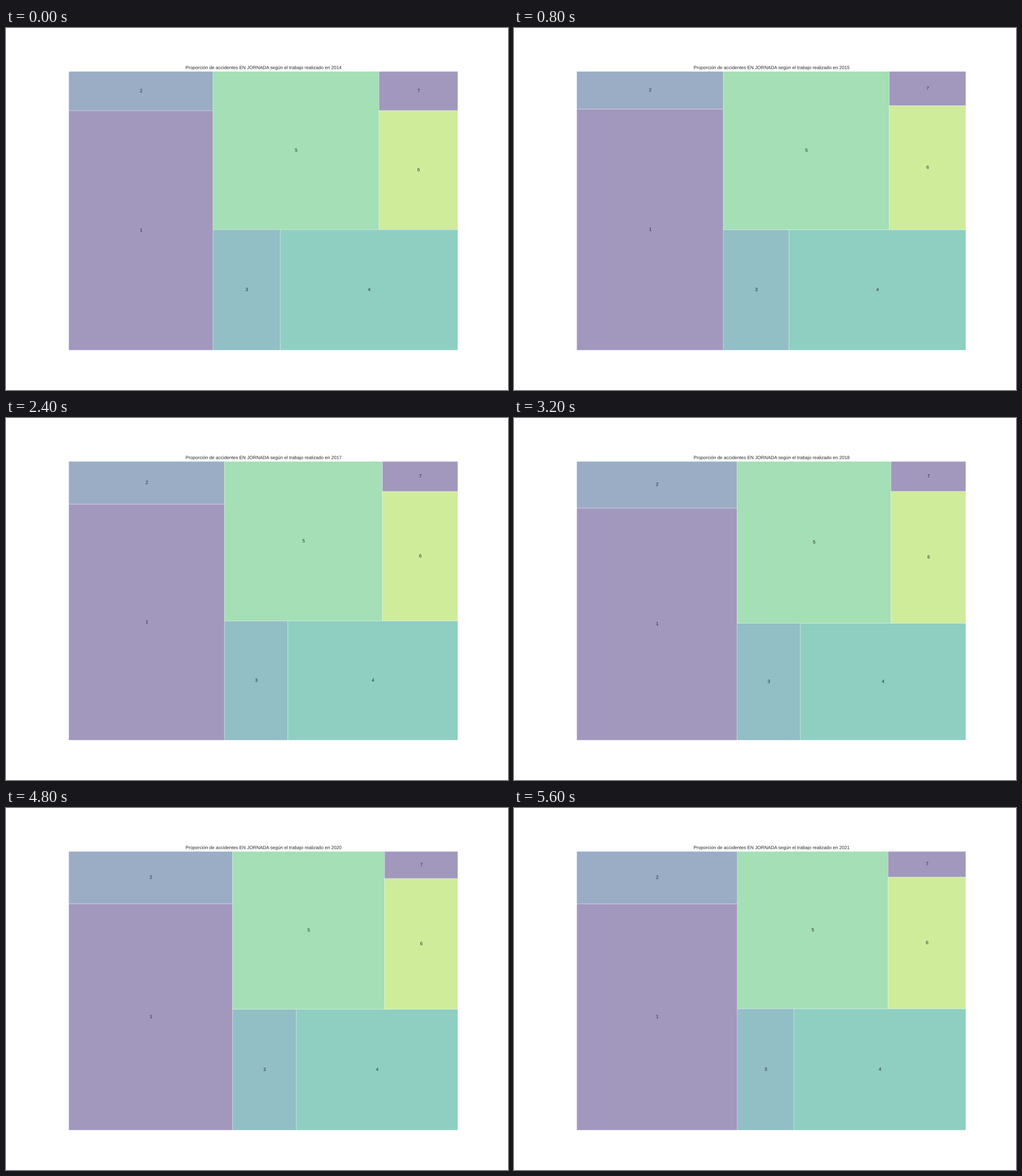
Recreate the animation shown at these times as a matplotlib script. Size 881 by 636 pixels, loop 6400 ms.

```python
import matplotlib.pyplot as plt
from matplotlib.animation import FuncAnimation
from matplotlib.patches import PathPatch
from matplotlib.textpath import TextPath
from matplotlib.transforms import Affine2D, ScaledTranslation

plt.rcParams["font.family"] = "Liberation Sans"

W, H = 881, 636
DPI = W / 18
FIRST_YEAR, LAST_YEAR = 2014, 2021
FONT_SIZE = 12
INK = "0.15"

viridis = plt.get_cmap("viridis")
COLORS = [viridis((i % 6 + 1) / 7) for i in range(7)]


def shares(year):
    """Percentage of each type of work, as smooth trends over the years."""
    t = year - FIRST_YEAR
    shock = year == 2020
    s1 = 31.87 + 0.68 * t + 0.043 * t**2 - 0.0152 * t**3
    s2 = 5.2 - 0.433 * t + 0.345 * t**2 - 0.033 * t**3
    s3 = 7.48 - 0.165 * t + 0.6 * shock
    s4 = 19.76 - 0.119 * min(t, 5)**2 + 1.23 * max(t - 5, 0)
    s6 = 8.65 + 0.115 * t - 0.5 * shock
    s7 = 2.84 - 0.547 * t + 0.129 * t**2 - 0.0102 * t**3 - 0.17 * shock
    s5 = 100 - (s1 + s2 + s3 + s4 + s6 + s7)
    return [s1, s2, s3, s4, s5, s6, s7]


def strip(areas, x, y, dx, dy):
    """Fill one strip along the shorter side; return its boxes and the rest."""
    total = sum(areas)
    boxes = []
    if dx >= dy:
        w, top = total / dy, y
        for a in areas:
            boxes.append((x, top, w, a / w))
            top += a / w
        return boxes, (x + w, y, dx - w, dy)
    h, left = total / dx, x
    for a in areas:
        boxes.append((left, y, a / h, h))
        left += a / h
    return boxes, (x, y + h, dx, dy - h)


def worst_ratio(areas, space):
    boxes, _ = strip(areas, *space)
    return max(max(w / h, h / w) for _, _, w, h in boxes)


def squarify(areas, space):
    if not areas:
        return []
    n = 1
    while n < len(areas) and (
        worst_ratio(areas[:n], space) >= worst_ratio(areas[:n + 1], space)
    ):
        n += 1
    boxes, rest = strip(areas[:n], *space)
    return boxes + squarify(areas[n:], rest)


fig = plt.figure(figsize=(W / DPI, H / DPI), dpi=DPI, facecolor="white")
ax = fig.add_axes([0.125, 0.11, 0.775, 0.77])


def label(x, y, text, rise):
    """Text as outlines, centred on x, its baseline `rise` points above y."""
    width = TextPath((0, 0), text, size=FONT_SIZE).get_extents().width
    path = TextPath((-width / 2, rise), text, size=FONT_SIZE)
    place = (Affine2D().scale(1 / 72) + fig.dpi_scale_trans
             + ScaledTranslation(x, y, ax.transData))
    ax.add_artist(PathPatch(path, facecolor=INK, linewidth=0, snap=False,
                            transform=place, clip_on=False, zorder=3))


def draw(i):
    year = FIRST_YEAR + i
    ax.clear()
    ax.axis("off")
    boxes = squarify([100 * s for s in shares(year)], (0, 0, 100, 100))
    for k, (x, y, w, h) in enumerate(boxes):
        ax.bar(x, h, width=w, bottom=y, align="edge", color=COLORS[k],
               edgecolor="white", linewidth=1, alpha=0.5, snap=False)
        label(x + w / 2, y + h / 2, str(k + 1), -0.26 * FONT_SIZE)
    label(50, 100, "Proporción de accidentes EN JORNADA según el trabajo "
          f"realizado en {year}", FONT_SIZE / 2)
    ax.set(xlim=(0, 100), ylim=(0, 100))
    return []


anim = FuncAnimation(fig, draw, frames=LAST_YEAR - FIRST_YEAR + 1,
                     init_func=lambda: draw(0), interval=800,
                     repeat=True, repeat_delay=0)
plt.show()
```
